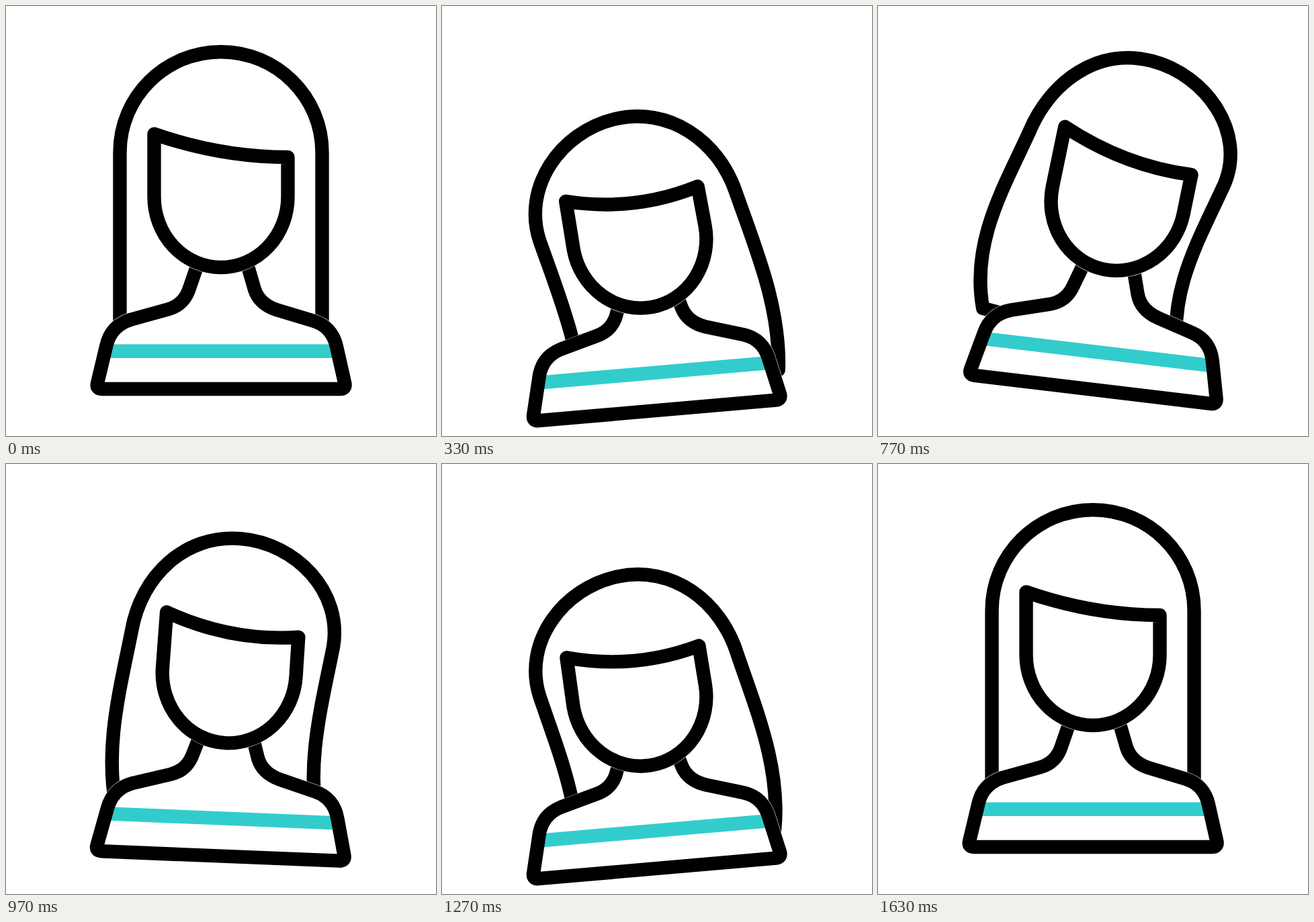
Recreate the animation shown at these times as an HTML page. Size 640 px wide and 640 px high, loop 2000 ms.

```html
<!DOCTYPE html>
<html lang="en">
<head>
<meta charset="utf-8">
<title>Swaying woman icon</title>
<style>
  html, body { margin: 0; width: 100%; height: 100%; overflow: hidden; background: #fff; }
  svg { display: block; width: 100%; height: 100%; }
  path { fill: #fff; stroke: #000; stroke-width: 20.4; stroke-linejoin: round; }
  .halo { stroke: #fff; stroke-width: 21.4; }
  .stripe { fill: none; stroke: #33cccc; }
  .outline { fill: none; }
</style>
</head>
<body>
<svg viewBox="0 0 640 640">
  <g id="hair"><path/></g>
  <g id="body">
    <path class="halo"/>
    <path class="stripe" d="M149 513.8H492"/>
    <path class="outline"/>
  </g>
  <g id="face"><path class="halo"/><path class="outline"/></g>
</svg>
<script>
const FRAME = 100 / 3, LOOP = 2000, SPAN = 12, LAG = 1, LAST = 49;

// lean, lift, headX, headY, tilt, fringeLeft, fringeDip, hairX, hairY, swing
const REST = [0, 0, 0, 0, 0, -93.5, -59, 0, -66, 0];
const LEFT = [-5.5, 1, -2, 31, -6.3, -71, -36.5, 4, -26.6, 30];
const RIGHT = [7.3, 0.95, 4, 1, 5.2, -92, -52, 0, -65, -50];
const LEFT_AGAIN = LEFT.map((v, i) => i === 4 ? -4.85 : v);
const KEYS = [REST, LEFT, RIGHT, LEFT_AGAIN, REST];

const TORSO = 'M143 570H497Q506 570 504.3 561.5L492 507C488 488 476 474 457 468.5' +
  'L403 452.3C387 447 375 437 370 422L361 391L355 372H290L283 391L273 420' +
  'C268 436 257 447 241 451.5L185 467C166 473 154 486 149.5 505L136 561.5Q134 570 143 570Z';

const [hair, body, face] = ['hair', 'body', 'face'].map(id => document.getElementById(id));
const ease = u => 0.3 * u + 0.7 * u * u * (3 - 2 * u);

function setPaths(selector, d) {
  for (const path of document.querySelectorAll(selector)) path.setAttribute('d', d);
}

function pose(frame) {
  const pos = Math.min(Math.max(frame / SPAN, 0), KEYS.length - 1);
  const i = Math.min(Math.floor(pos), KEYS.length - 2);
  const k = ease(pos - i);
  return KEYS[i].map((v, j) => v + (KEYS[i + 1][j] - v) * k);
}

// Half-round crown with two strands; s bends the strands sideways.
function hairPath(s) {
  const w = 150.5, top = -149.8, end = 270, h = 83, up = s * 0.28, down = s * 0.38;
  return `M${-w} 0C${-w - up} ${-h} ${-h} ${top} 0 ${top}` +
    `S${w - up} ${-h} ${w} 0` +
    `C${w + down} 90 ${w + s} ${end - 90} ${w} ${end}H${-w}` +
    `C${-w + s} ${end - 90} ${-w + down} 90 ${-w} 0Z`;
}

// The left corner slides inwards as it drops.
function facePath(left, dip) {
  const x = -99.5 + (left + 93.5) * 0.09;
  return `M${x} ${left}Q0 ${dip} 99.5 -59V0A99.5 105 0 0 1 -99.5 0Z`;
}

function draw(frame) {
  const [lean, lift, headX, headY, tilt, left, dip, hairX, hairY] = pose(frame);
  const swing = pose(frame - LAG)[9];
  const torso = `translate(${-lift} ${20.5 * lift}) rotate(${lean} 477 565)`;
  const head = `translate(${headX} ${headY}) ${torso} translate(320 284) rotate(${tilt})`;

  body.setAttribute('transform', torso);
  face.setAttribute('transform', head);
  hair.setAttribute('transform',
    `${head} translate(${hairX} ${hairY}) rotate(${0.27 * (lean + tilt)})`);
  setPaths('#hair path', hairPath(swing));
  setPaths('#face path', facePath(left, dip));
}

setPaths('#body .halo, #body .outline', TORSO);
const start = performance.now();

function tick() {
  const t = Math.max(performance.now() - start, 0) % LOOP;
  const ticks = Math.floor(t / 10) * 10;
  draw(Math.min(Math.floor((ticks + 3.4) / FRAME), LAST));
  requestAnimationFrame(tick);
}
tick();
</script>
</body>
</html>
```
